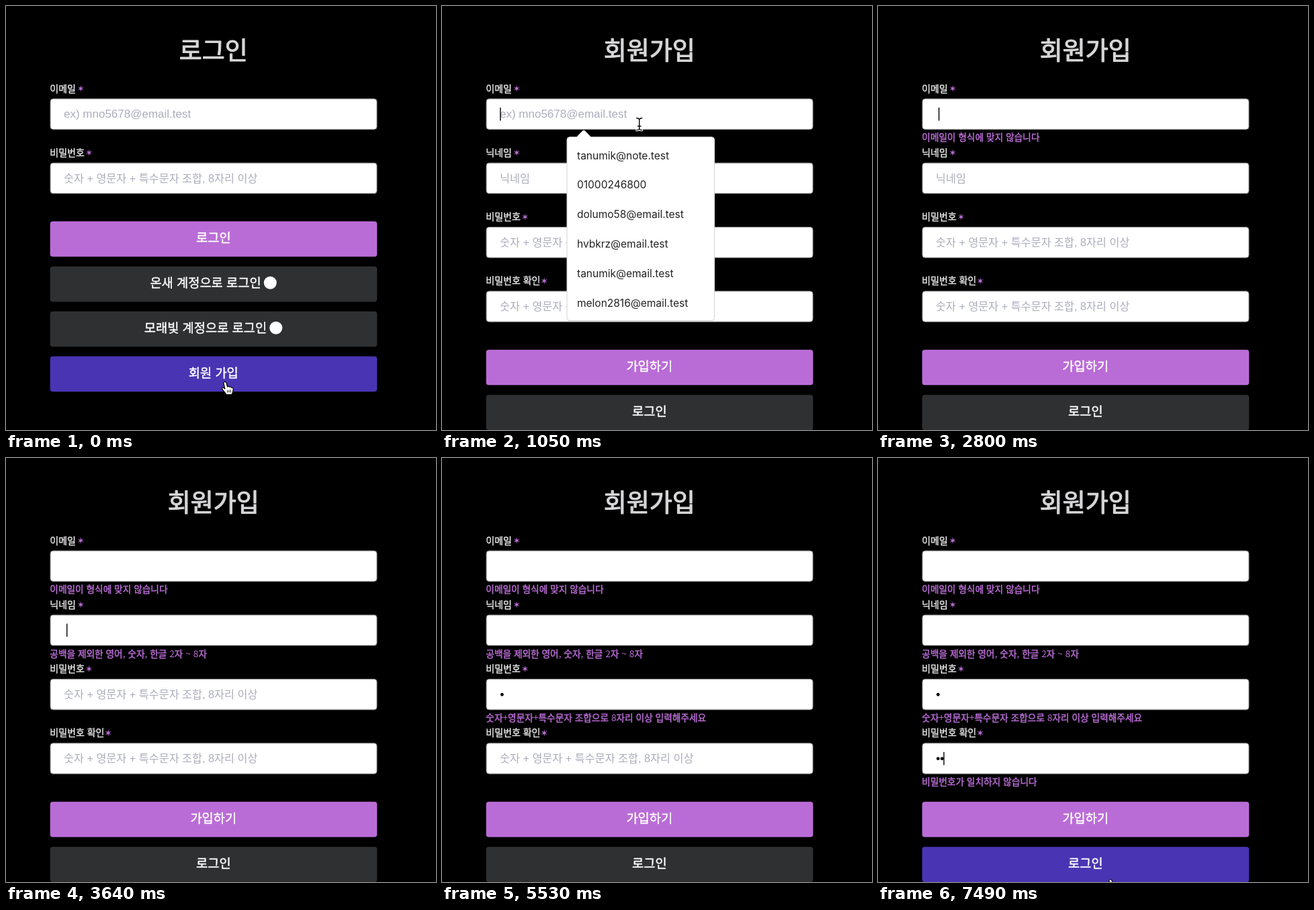
Recreate the animation shown at these times as an HTML page. Size 640x630 px, loop 7560 ms.

```html
<!DOCTYPE html>
<html lang="ko">
<head>
<meta charset="utf-8">
<title>회원가입</title>
<style>
  html, body { margin: 0; width: 100%; height: 100%; overflow: hidden; background: #000; }
  svg { display: block; width: 100%; height: 100%; }
  text { font-family: "Noto Sans CJK KR", "Noto Sans CJK", "Noto Sans KR", sans-serif; stroke-linejoin: round; white-space: pre; }
  .title { font-size: 37px; fill: #d6d6d8; stroke: #d6d6d8; stroke-width: .032em; text-anchor: middle; }
  .label { font-size: 14px; fill: #e4e4e6; stroke: #e4e4e6; stroke-width: .03em; }
  .hint { font-size: 16.25px; fill: #abadbb; font-family: "Liberation Sans", "Noto Sans CJK KR", "Noto Sans CJK", sans-serif; }
  .latin { font-size: 17px; }
  .error { font-size: 13.7px; fill: #ba6cd6; stroke: #ba6cd6; stroke-width: .035em; }
  .error .thin { stroke: none; }
  .button { font-size: 18.7px; fill: #fff; stroke: #fff; stroke-width: .022em; text-anchor: middle; }
  .item { font-family: Inter, "Noto Sans", sans-serif; font-size: 15.5px; fill: #222; }
</style>
</head>
<body>
<svg id="stage" viewBox="0 0 640 630" xmlns="http://www.w3.org/2000/svg"></svg>
<script>
const LOOP = 7560, STEP = 70, BLINK = 500;
const PURPLE = '#ba6cd6', DARK = [47, 48, 50], VIOLET = [73, 52, 179];
const ROWS = [137.9, 233.2, 328.6, 423.8];
const stage = document.getElementById('stage');

function add(parent, tag, attrs = {}, content = '') {
  const node = document.createElementNS('http://www.w3.org/2000/svg', tag);
  for (const key in attrs) node.setAttribute(key, attrs[key]);
  node.textContent = content;
  return parent.appendChild(node);
}
const group = parent => add(parent, 'g');
const label = (parent, cls, x, y, str) => add(parent, 'text', { class: cls, x, y }, str);
const show = (node, on) => node.setAttribute('visibility', on ? 'inherit' : 'hidden');
const mix = (a, b, p) => `rgb(${a.map((v, i) => Math.round(v + (b[i] - v) * p))})`;
const clamp = v => Math.max(0, Math.min(1, v));
const ease = p => p * p * (3 - 2 * p);

function star(parent, cx, cy) {
  const points = Array.from({ length: 12 }, (_, i) => {
    const r = i % 2 ? 1.6 : 5, a = i * Math.PI / 6;
    return [cx + r * Math.sin(a), cy - r * Math.cos(a)].map(v => v.toFixed(2));
  });
  add(parent, 'polygon', { points: points.join(' '), fill: PURPLE });
}

function field(parent, row, name, starX, hint, latin = '') {
  const y = ROWS[row];
  label(parent, 'label', 65.3, y - 10.4, name);
  star(parent, starX, y - 15.3);
  add(parent, 'rect', { x: 66, y, width: 486, height: 45.4, rx: 4, fill: '#fff', stroke: '#858585', 'stroke-width': 1 });
  return label(parent, 'hint ' + latin, 86, y + 28.4, hint);
}

function button(parent, y, str, fill, textX = 308.8) {
  const box = add(parent, 'rect', { x: 65.7, y, width: 486.6, height: 52.4, rx: 4, fill });
  label(parent, 'button', textX, y + 31, str);
  return box;
}

function errorLine(row, str) {
  const line = label(stageForm, 'error', 65.3, ROWS[row] + 62.4, '');
  str.split(/([0-9~+,]+)/).forEach((part, i) => add(line, 'tspan', i % 2 ? { class: 'thin' } : {}, part));
  return line;
}

const emailHint = 'ex) mno5678@email.test';
const passHint = '숫자 + 영문자 + 특수문자 조합, 8자리 이상';

// Login page
const login = group(stage);
label(login, 'title', 308.8, 80, '로그인');
field(login, 0, '이메일', 111.2, emailHint, 'latin');
field(login, 1, '비밀번호', 123.6, passHint);
button(login, 320, '로그인', PURPLE);
button(login, 387, '온새 계정으로 로그인', mix(DARK, DARK, 0), 297);
add(login, 'circle', { cx: 393.3, cy: 411.3, r: 9.5, fill: '#fff' });
button(login, 453.8, '모래빛 계정으로 로그인', mix(DARK, DARK, 0), 297);
add(login, 'circle', { cx: 401.8, cy: 478.3, r: 9.5, fill: '#fff' });
button(login, 520.5, '회원 가입', mix(VIOLET, VIOLET, 0));

// Sign-up page
const stageForm = group(stage);
label(stageForm, 'title', 308.8, 80, '회원가입');
const hints = [
  field(stageForm, 0, '이메일', 111.2, emailHint, 'latin'),
  field(stageForm, 1, '닉네임', 111.2, '닉네임'),
  field(stageForm, 2, '비밀번호', 123.6, passHint),
  field(stageForm, 3, '비밀번호 확인', 152.2, passHint)
];
const errors = [
  '이메일이 형식에 맞지 않습니다',
  '공백을 제외한 영어, 숫자, 한글 2자 ~ 8자',
  '숫자+영문자+특수문자 조합으로 8자리 이상 입력해주세요',
  '비밀번호가 일치하지 않습니다'
].map((str, row) => errorLine(row, str));
button(stageForm, 510.8, '가입하기', PURPLE);
const loginButton = button(stageForm, 577.7, '로그인', '#000');
const dot = (x, row) => add(stageForm, 'circle', { cx: x, cy: ROWS[row] + 22.9, r: 2.4, fill: '#000' });
const dots = [dot(89.4, 2), dot(89.4, 3), dot(95.3, 3)];
const caret = add(stageForm, 'rect', { width: 1.4, height: 19.5, fill: '#000' });

// Suggestion list
const list = group(stageForm);
add(list, 'path', {
  d: 'M190 194.7H200.5L209.3 185.6Q211 184.2 212.7 185.6L221.5 194.7H401.5Q405.5 194.7 405.5 198.7V463.5Q405.5 467.5 401.5 467.5H190Q186 467.5 186 463.5V198.7Q186 194.7 190 194.7Z',
  fill: '#fff', stroke: '#d4d4d8', 'stroke-width': 1
});
['tanumik@note.test', '01000246800', 'dolumo58@email.test', 'hvbkrz@email.test', 'tanumik@email.test', 'melon2816@email.test']
  .forEach((str, i) => label(list, 'item', 201, 227.5 + 43.8 * i, str));

// Pointers
function pointer(draw) {
  const g = group(stage);
  draw(g);
  return g;
}
const pointers = {
  hand: pointer(g => {
    add(g, 'path', {
      d: 'M-2.2 1.5Q0-1.5 2 1.5L3.5 7.5Q5.5 6 6.8 7.8Q8.6 6.8 9.8 8.8Q12 8.2 12.2 11L11.5 15.5L10 19H2L-1 15L-4.5 10.5Q-4.5 8-2 9L-.2 10.5Z',
      fill: '#fff', stroke: '#000', 'stroke-width': 1.2, 'stroke-linejoin': 'round'
    });
    add(g, 'path', { d: 'M3.6 12.5V16M6 12.3V16M8.4 12.1V16', stroke: '#000', 'stroke-width': .9 });
  }),
  beam: pointer(g => {
    const d = 'M-4-8.5Q-1-8.5 0-6.5Q1-8.5 4-8.5M0-6.5V7.5M-4 9.5Q-1 9.5 0 7.5Q1 9.5 4 9.5M-2.2 3.5H2.2';
    for (const [stroke, width] of [['#fff', 3.4], ['#000', 1.4]])
      add(g, 'path', { d, fill: 'none', stroke, 'stroke-width': width, 'stroke-linecap': 'round' });
  }),
  arrow: pointer(g => add(g, 'path', {
    d: 'M0 0V15.5L3.6 12.2L6 17.6L8.6 16.4L6.2 11.2H11Z',
    fill: '#000', stroke: '#fff', 'stroke-width': 1.2, 'stroke-linejoin': 'round'
  }))
};

const SIGNUP = 140, HIDE_POINTER = 2660, BACK = 7350;
const typed = [2660, 3570, 4620, 5810];
const SECOND_DOT = 6020;
// Each caret: start time, field, x
const carets = [
  [840, 0, 86.2], [2660, 0, 90], [3150, 1, 86.2], [3570, 1, 90],
  [4340, 2, 86.2], [4620, 2, 92], [5600, 3, 86.2], [5810, 3, 92], [SECOND_DOT, 3, 97.4]
];

function pointerAt(t) {
  if (t < HIDE_POINTER) {
    const p = ease(clamp((t - 280) / 490));
    return [326 - 32.3 * p, 558.3 - 383.3 * p];
  }
  return t < BACK ? null : [346, 629 - 3 * clamp((t - BACK) / 140)];
}

function pointerKind(y) {
  if (y > 577 || (y > 510 && y < 563)) return 'hand';
  return ROWS.some(top => y > top && y < top + 46) ? 'beam' : 'arrow';
}

function render(time) {
  const t = Math.floor(time % LOOP / STEP) * STEP;
  show(login, t < SIGNUP);
  show(stageForm, t >= SIGNUP);
  hints.forEach((hint, i) => show(hint, t < typed[i]));
  errors.forEach((line, i) => show(line, t >= (i === 3 ? SECOND_DOT : typed[i])));
  [typed[2], typed[3], SECOND_DOT].forEach((at, i) => show(dots[i], t >= at));
  show(list, t >= 910 && t < 1890);

  const active = carets.filter(c => c[0] <= t).pop();
  const lit = active && Math.floor((t - active[0]) / BLINK) % 2 === 0;
  show(caret, lit);
  if (lit) {
    caret.setAttribute('x', active[2]);
    caret.setAttribute('y', ROWS[active[1]] + 13);
  }

  loginButton.setAttribute('fill', mix(DARK, VIOLET, clamp((t - BACK + STEP) / 210)));

  const pos = pointerAt(t), kind = pos && pointerKind(pos[1]);
  for (const name in pointers) {
    show(pointers[name], name === kind);
    if (name === kind) pointers[name].setAttribute('transform', `translate(${pos})`);
  }
}

const start = performance.now();
function tick() {
  render(performance.now() - start);
  requestAnimationFrame(tick);
}
tick();
</script>
</body>
</html>
```
